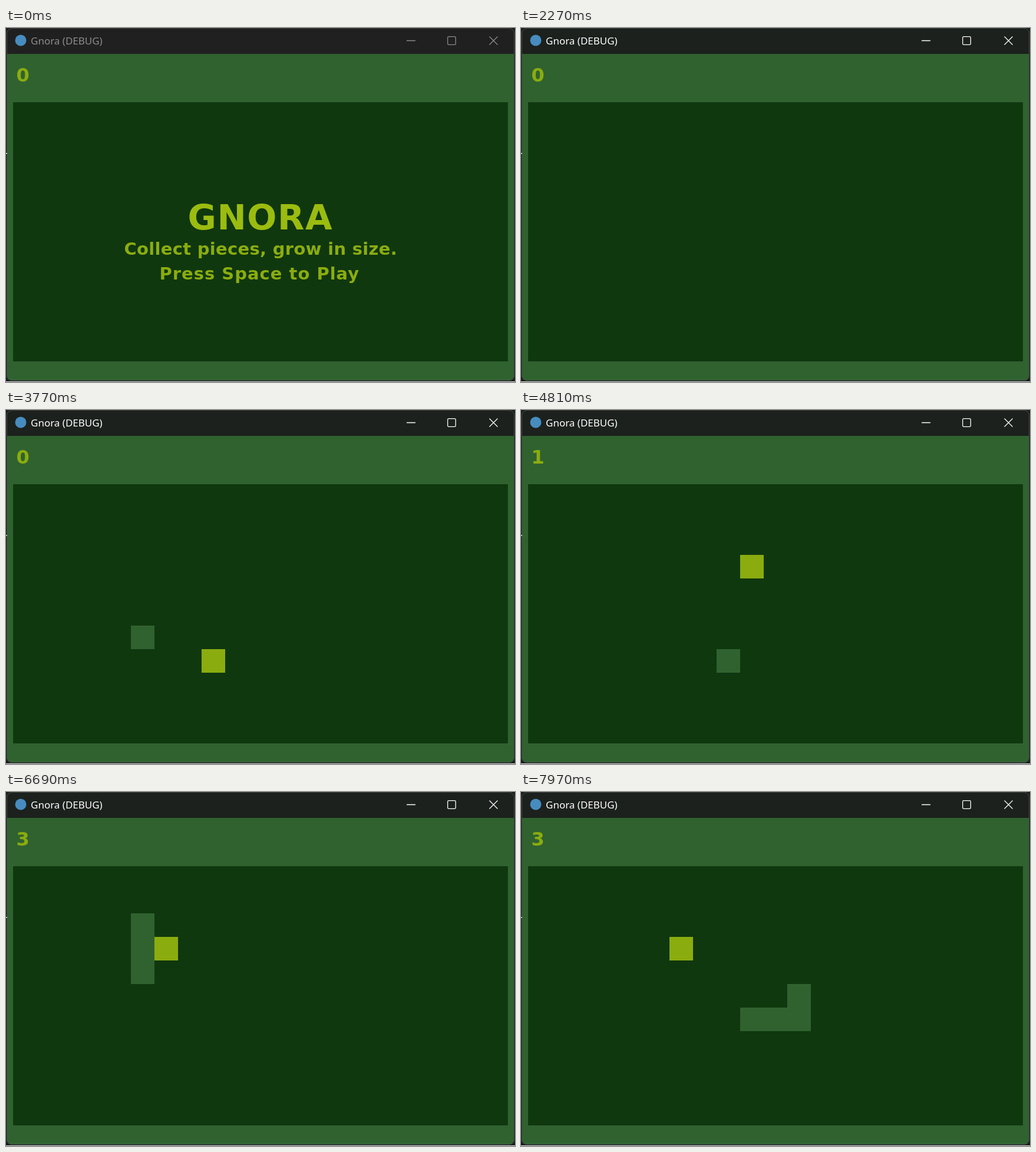
These frames come from a looping animation (864x601 px, 8 s). An HTML page:

```html
<!DOCTYPE html>
<html lang="en">
<head>
<meta charset="utf-8">
<title>Gnora</title>
<style>
  html, body { margin: 0; width: 100%; height: 100%; overflow: hidden; background: #1b1e20; }
  svg { display: block; width: 864px; height: 601px; }
  .bar { font: 17px "Noto Sans", "Open Sans", sans-serif; }
  .game { font-family: "DejaVu Sans", sans-serif; font-weight: bold; fill: #8bac0f; }
  .head { font-size: 59px; fill: #9bbc0f; letter-spacing: 1.5px; }
  .line { font-size: 29px; }
  .score { font-size: 32px; }
</style>
</head>
<body>
<svg viewBox="0 0 864 601">
  <defs><clipPath id="frame"><rect x="1" y="0" width="862" height="599" rx="9"/></clipPath></defs>
  <g clip-path="url(#frame)">
    <rect width="864" height="601" fill="#306230"/>
    <rect id="bar" width="864" height="44"/>
    <rect x="12" y="126" width="840" height="440" fill="#0f380f"/>
  </g>
  <rect x="1.5" y=".5" width="861" height="598" rx="9" fill="none" stroke="#424644"/>
  <rect y="600" width="864" height="1" fill="#e6e6e6"/>
  <rect y="212" width="2" height="2" fill="#b8b8b8"/>

  <circle cx="25" cy="21" r="9.5" fill="#478cbf"/>
  <text id="name" class="bar" x="42" y="28">Gnora (DEBUG)</text>
  <g id="buttons" fill="none" stroke-width="1.3">
    <path d="M680 21.5h15M820.5 14.5l14 14m0-14l-14 14"/>
    <rect x="749.7" y="14.7" width="13.6" height="13.6" rx="1.8"/>
  </g>

  <text id="score" class="game score" x="17.5" y="91">0</text>
  <g id="intro" class="game">
    <text class="head" x="308.5" y="342">GNORA</text>
    <text class="line" x="200.5" y="384.5" letter-spacing=".3">Collect pieces, grow in size.</text>
    <text class="line" x="260.5" y="426.5" letter-spacing="1">Press Space to Play</text>
  </g>
  <rect id="food" width="40" height="40" fill="#8bac0f"/>
  <path id="body" fill="#306230"/>
  <path id="cursor" d="M0 0v21.5l5-4.6 3.4 7.7 3.6-1.6-3.3-7.4h6.8z" fill="#fff" stroke="#000" stroke-width="1.1"/>
</svg>
<script>
const LOOP = 8000, INTRO_END = 2270, START = 2300;
const $ = id => document.getElementById(id);
const bar = $('bar'), label = $('name'), buttons = $('buttons'), score = $('score');
const intro = $('intro'), food = $('food'), body = $('body'), cursor = $('cursor');

const DIRS = { L: [-1, 0], R: [1, 0], U: [0, -1], D: [0, 1] };
const TURNS = 'LLLLLDDRRRRUUUUULLLLDDDDRRRRRRU';
const TIMES = [
  2530, 2780, 3040, 3300, 3530, 3770, 4030, 4260, 4520, 4770, 5010,
  5170, 5310, 5470, 5600, 5760, 5910, 6070, 6200, 6330, 6490,
  6650, 6780, 6910, 7080, 7210, 7380, 7510, 7680, 7800, 7970
];
// Each piece: time it appears, column, row
const PIECES = [[START, 8, 7], [4810, 9, 3], [5630, 5, 4], [6690, 6, 3]];
// Pointer keys: time, x, y
const POINTER = [[160, 767, 595], [410, 698, 368], [680, 698, 368], [790, 707, 396]];

const px = col => 12 + col * 40;
const py = row => 126 + row * 40;
const eatenBefore = t => PIECES.slice(1).filter(p => p[0] < t).length;

const path = [{ t: START, col: 10, row: 5 }];
[...TURNS].forEach((d, i) => {
  const last = path[i], [dx, dy] = DIRS[d];
  path.push({ t: TIMES[i], col: last.col + dx, row: last.row + dy });
});

const clamp = v => Math.max(0, Math.min(1, v));
const mix = (a, b, k) => a + (b - a) * k;
const rgb = (a, b, k) => `rgb(${a.map((v, i) => Math.round(mix(v, b[i], k)))})`;
const show = (el, on) => { el.style.display = on ? '' : 'none'; };

function drawWindow(t) {
  const focus = clamp((t - 550) / 100);
  bar.setAttribute('fill', rgb([32, 32, 32], [28, 33, 29], focus));
  const ink = rgb([140, 140, 140], [255, 255, 255], focus);
  label.setAttribute('fill', ink);
  buttons.setAttribute('stroke', ink);
}

function drawPointer(t) {
  const on = t >= 160 && t < 810;
  show(cursor, on);
  if (!on) return;
  const i = Math.min(POINTER.filter(p => p[0] <= t).length, POINTER.length - 1);
  const [t0, x0, y0] = POINTER[i - 1], [t1, x1, y1] = POINTER[i];
  const k = 1 - (1 - clamp((t - t0) / (t1 - t0))) ** 2;
  cursor.setAttribute('transform', `translate(${mix(x0, x1, k)} ${mix(y0, y1, k)})`);
}

function drawGame(t) {
  const playing = t >= START;
  show(intro, t < INTRO_END);
  show(food, playing);
  show(body, playing);
  const eaten = PIECES.filter(p => p[0] <= t).length - 1;
  score.textContent = Math.max(0, eaten);
  if (!playing) return;

  const [, col, row] = PIECES[eaten];
  food.setAttribute('x', px(col));
  food.setAttribute('y', py(row));

  const visited = path.filter(p => p.t <= t);
  const length = 1 + eatenBefore(visited[visited.length - 1].t);
  body.setAttribute('d', visited.slice(-length)
    .map(p => `M${px(p.col)} ${py(p.row)}h40v40h-40z`).join(''));
}

function frame() {
  const t = performance.now() % LOOP;
  drawWindow(t);
  drawPointer(t);
  drawGame(t);
  requestAnimationFrame(frame);
}
frame();
</script>
</body>
</html>
```
